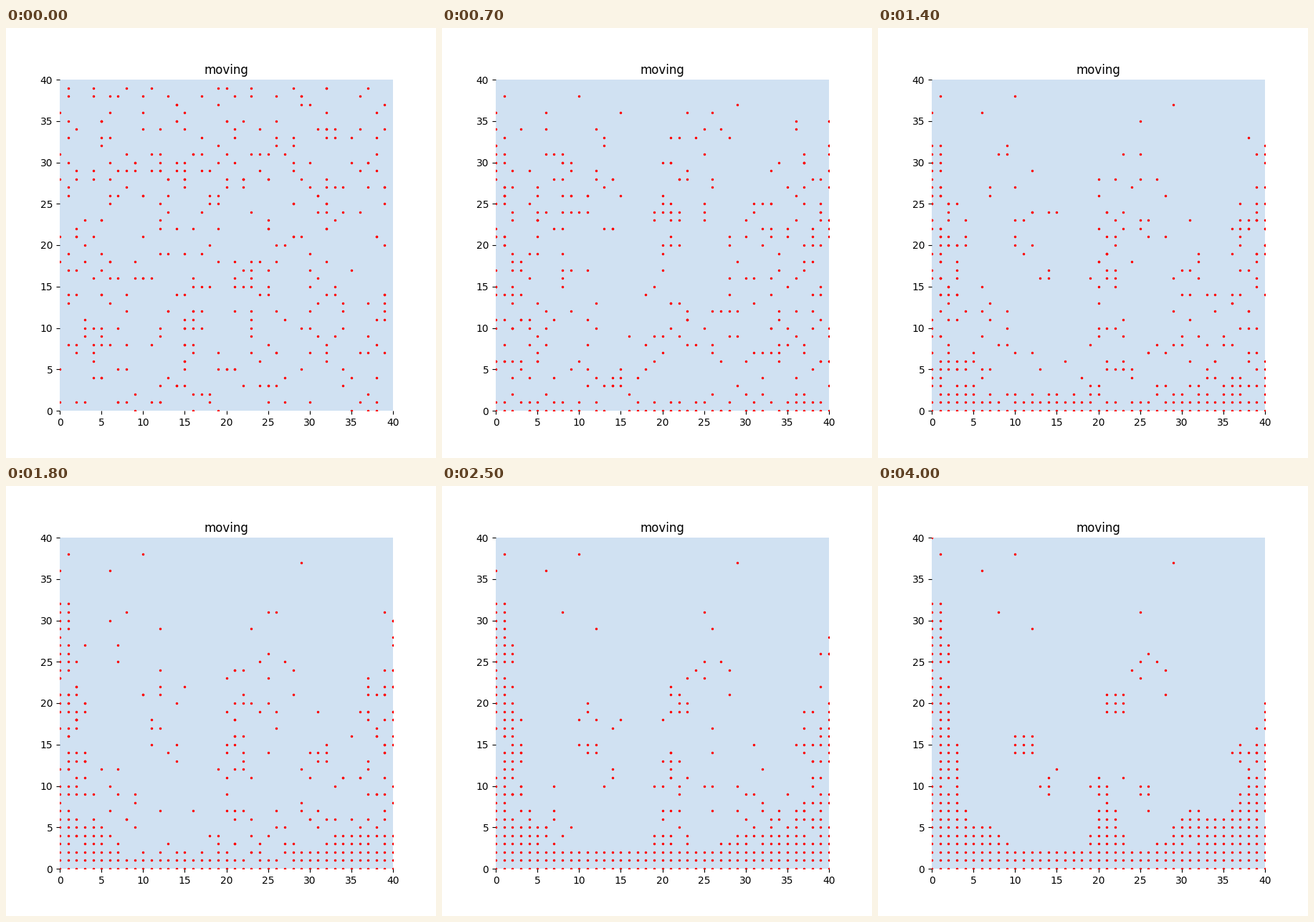
Animation of 600x600 px, one loop 4.1 s. Source, as a matplotlib script:

```python
import numpy as np
import matplotlib.pyplot as plt
from matplotlib.animation import FuncAnimation

FRAMES = 41
SIZE = 40
rng = np.random.default_rng(12)

# Dots that never move
still = [(1, 38), (6, 36), (10, 38), (29, 37), (8, 31), (25, 31), (12, 29),
         (28, 21), (25, 23), (23, 11), (26, 7)]

# Clumps left hanging above the pile: centre and radius
clumps = [(11, 15, 1.5), (22, 20, 1.5), (14, 10, 1.2), (25.5, 9.5, 0.8),
          (20, 10, 1.2), (37, 14, 1.2)]


def bump(x, centre, width, height):
    return height * np.exp(-((x - centre) / width) ** 2)


def pile_top(x):
    """Top row of the final pile: two walls and some low mounds."""
    left = 30 / (1 + (x / 2.8) ** 5)
    right = 18.5 * np.exp((x - SIZE) / 3.3)
    mounds = bump(x, 6.5, 2.3, 3) + bump(x, 21, 1.7, 7.5) + bump(x, 31, 2.5, 4)
    return left + right + mounds + 2.4


def make_targets():
    """Cells filled at the end; the upper left wall has random holes."""
    x, y = np.meshgrid(np.arange(SIZE + 1), np.arange(SIZE + 1))
    ragged = (x < 3) & (y > 9) & (rng.random(x.shape) < 0.32)
    filled = (y <= pile_top(x)) & ~ragged
    for cx, cy, radius in clumps:
        filled |= np.hypot(x - cx, y - cy) <= radius
    filled |= (y == 26 - abs(x - 26)) & (y >= 24)
    return np.column_stack([x[filled], y[filled]])


def pair_up(start, goal, rounds=3000):
    """Swap goals between dots until their paths hardly cross."""
    goal = goal[rng.permutation(len(goal))]
    half = len(goal) // 2
    for _ in range(rounds):
        order = rng.permutation(len(goal))
        a, b = order[:half], order[half:2 * half]
        crossed = ((start[a] - start[b]) * (goal[a] - goal[b])).sum(1) < 0
        a, b = a[crossed], b[crossed]
        goal[a], goal[b] = goal[b].copy(), goal[a].copy()
    return goal


def walk(start, goal):
    """Lazy walk towards the goal, with some wandering on the way."""
    pace = rng.uniform(0.55, 1, (len(start), 1))
    path = [start]
    for step in range(1, FRAMES):
        pos = path[-1]
        gap = goal - pos
        move = np.sign(gap) * (rng.random(pos.shape) < pace)
        if step < 32:
            stray = (rng.random(len(pos)) < 0.1) & gap.any(axis=1)
            move[stray] = rng.integers(-1, 2, (stray.sum(), 2))
        path.append(np.clip(pos + move, 0, SIZE))
    return path


targets = make_targets()
starts = rng.integers(0, SIZE, targets.shape)
paths = walk(starts, pair_up(starts, targets))


def dots_at(step):
    climber = (0, 36 + round(max(0, step - 25) * 4 / 15))
    return np.vstack([paths[step], still, climber])


fig, ax = plt.subplots(figsize=(6, 6), dpi=100)
ax.set_facecolor("#d0e1f2")
ax.set_title("moving")
ax.set(xlim=(0, SIZE), ylim=(0, SIZE))
ax.set_xticks(range(0, SIZE + 1, 5))
ax.set_yticks(range(0, SIZE + 1, 5))
ax.spines[:].set_visible(False)
dots, = ax.plot([], [], "r.", markersize=3)


def draw(step):
    dots.set_data(*dots_at(step).T)
    return dots,


anim = FuncAnimation(fig, draw, frames=FRAMES, interval=100, repeat=True,
                     repeat_delay=0)
plt.show()
```
